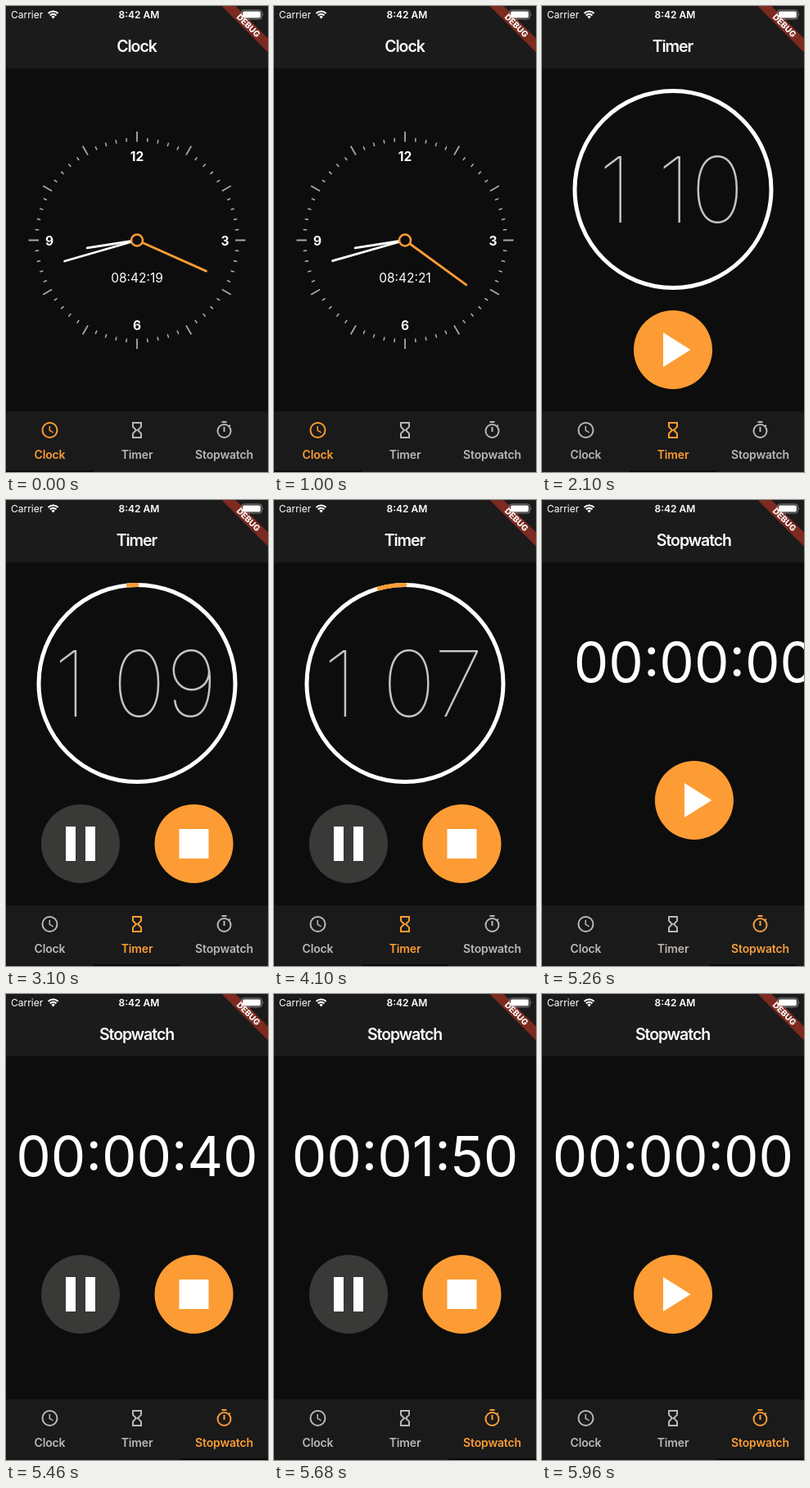
Animation, 320 px wide and 568 px high, one loop 6960 ms. Source, as an HTML page:

```html
<!DOCTYPE html>
<html lang="en">
<head>
<meta charset="utf-8">
<title>Clock app</title>
<style>
  html, body { margin: 0; width: 100%; height: 100%; overflow: hidden; background: #0d0d0d; }
  svg { display: block; width: 320px; height: 568px; }
  text { font-family: Inter, Roboto, "Liberation Sans", sans-serif; fill: #fff; text-anchor: middle; }
  .title { font-size: 19.5px; font-weight: 600; letter-spacing: -1.05px; }
  .numeral { font-size: 15.5px; font-weight: 700; }
  .digital { font-size: 15.5px; }
  .count { font-size: 111px; font-weight: 100; fill: #c4c4c4; }
  .watch { font-size: 67.5px; }
  .tab text { font-size: 14px; font-weight: 600; letter-spacing: -.15px; fill: currentColor; }
  .icon { fill: none; stroke: currentColor; stroke-width: 2; }
  .hand { stroke-width: 2.8; stroke-linecap: round; }
</style>
</head>
<body>
<svg id="stage" viewBox="0 0 320 568">
  <rect width="320" height="568" fill="#0d0d0d"/>
  <rect width="320" height="76" fill="#1b1b1b"/>

  <g id="pages">
    <g>
      <text class="title" x="159.5" y="55.5">Clock</text>
      <g id="dial" transform="translate(160 285.5)"></g>
      <text class="digital" id="digital" x="160" y="337"></text>
    </g>
    <g transform="translate(320)">
      <text class="title" x="159.5" y="55.5">Timer</text>
      <circle cx="160" cy="223.5" r="120" fill="none" stroke="#fff" stroke-width="5"/>
      <path id="arc" fill="none" stroke="#fd9c34" stroke-width="5" stroke-linecap="round"/>
      <text class="count" id="count" x="158" y="264.3"></text>
      <g id="timerKeys" transform="translate(0 419)"></g>
    </g>
    <g transform="translate(640)">
      <text class="title" x="159.5" y="55.5">Stopwatch</text>
      <text class="watch" id="watch" x="160" y="222"></text>
      <g id="watchKeys" transform="translate(0 366)"></g>
    </g>
  </g>

  <rect y="494" width="320" height="74" fill="#1a1a1a"/>
  <rect id="marker" y="566" width="106.7" height="2" fill="#080808"/>
  <g class="tab" transform="translate(53.5)">
    <g class="icon" transform="translate(-12 505)">
      <circle cx="12" cy="12" r="9"/>
      <path d="M11.8 7v5.3l4.3 2.6" stroke-width="1.5"/>
    </g>
    <text y="552">Clock</text>
  </g>
  <g class="tab" transform="translate(160)">
    <path class="icon" transform="translate(-12 505)" d="M7 3H17V7.9L13 12L17 16.1V21H7V16.1L11 12L7 7.9Z"/>
    <text y="552">Timer</text>
  </g>
  <g class="tab" transform="translate(266.5)">
    <g class="icon" transform="translate(-12 505)">
      <circle cx="12" cy="13" r="8"/>
      <path d="M9 2H15M12 8V14M17.4 7.6L19.3 5.7"/>
    </g>
    <text y="552">Stopwatch</text>
  </g>

  <g transform="translate(320 0) rotate(45)">
    <rect x="-42" y="28" width="84" height="12" fill="#7d2a20"/>
    <text y="37.4" font-size="10.2" font-weight="800">DEBUG</text>
  </g>
  <text x="6" y="15" font-size="12" style="text-anchor:start">Carrier</text>
  <g fill="none" stroke="#fff" stroke-width="2.1">
    <path d="M51.6 8.9A8.7 8.7 0 0 1 63.6 8.9M53.8 11.4A5.4 5.4 0 0 1 61.4 11.4"/>
    <path d="M55.4 13.1A3.2 3.2 0 0 1 59.8 13.1L57.6 15.5Z" fill="#fff" stroke="none"/>
  </g>
  <text x="162.5" y="15" font-size="12" font-weight="600">8:42 AM</text>
  <rect x="287.5" y="5" width="25" height="11" rx="3" fill="none" stroke="#fff" stroke-opacity=".45"/>
  <rect x="289" y="6.5" width="22" height="8" rx="1.8" fill="#fff"/>
  <path d="M313.8 8.8q1.6 1.7 0 3.4z" fill="#fff" fill-opacity=".5"/>
</svg>

<script>
const LOOP = 6960, STEP = 20;
const ORANGE = [253, 156, 52], GREY = [184, 184, 184];
const TIMER_TOTAL = 70;

// Share of each page swipe done after every step
const SWIPES = [
  { start: 2000, done: [.06, .25, .55, .82, .96, 1] },
  { start: 5120, done: [.03, .08, .16, .28, .44, .62, .8, .919, .98, 1] }
];

const $ = id => document.getElementById(id);
const pad = n => String(n).padStart(2, "0");
const tabs = [...document.querySelectorAll(".tab")];

function point(angle, r) {
  const a = angle * Math.PI / 180;
  return [r * Math.sin(a), -r * Math.cos(a)].map(v => v.toFixed(2));
}

function spoke(angle, from, to) {
  return `M${point(angle, from)}L${point(angle, to)}`;
}

function buildDial() {
  let hours = "", minutes = "";
  for (let i = 0; i < 60; i++) {
    if (i % 5) minutes += spoke(i * 6, 120.5, 125);
    else hours += spoke(i * 6, 120, 132.5);
  }
  const numerals = [[12, 0, -97], [3, 107.5, 6], [6, 0, 109], [9, -107, 6]]
    .map(([n, x, y]) => `<text class="numeral" x="${x}" y="${y}">${n}</text>`).join("");
  $("dial").innerHTML = `
    <path d="${hours}" stroke="#a8a8a8" stroke-width="1.8"/>
    <path d="${minutes}" stroke="#b0b0b0" stroke-width="1.5"/>
    ${numerals}
    <path class="hand" id="hourHand" stroke="#fff"/>
    <path class="hand" id="minuteHand" stroke="#fff"/>
    <path class="hand" id="secondHand" stroke="#fd9c34"/>
    <circle r="7" fill="#0d0d0d" stroke="#fd9c34" stroke-width="2.6"/>`;
}

function buildKeys(group) {
  group.innerHTML = `
    <g>
      <circle cx="160" r="48" fill="#fd9c34"/>
      <path d="M148-21L181.5 0L148 21Z" fill="#fff"/>
    </g>
    <g>
      <circle cx="91" r="48" fill="#393938"/>
      <path d="M73-21h12v42h-12zM97-21h12v42h-12z" fill="#fff"/>
      <circle cx="229.5" r="48" fill="#fd9c34"/>
      <rect x="211.5" y="-18" width="36" height="36" fill="#fff"/>
    </g>`;
}

function showKeys(group, running) {
  group.children[0].style.display = running ? "none" : "";
  group.children[1].style.display = running ? "" : "none";
}

function pageAt(t) {
  return SWIPES.reduce((sum, { start, done }) => {
    if (t < start) return sum;
    const i = Math.floor((t - start) / STEP);
    return sum + done[Math.min(i, done.length - 1)];
  }, 0);
}

function drawPage(page) {
  $("pages").setAttribute("transform", `translate(${-320 * page})`);
  $("marker").setAttribute("x", 106.7 * page);
  tabs.forEach((tab, i) => {
    const k = Math.max(0, 1 - Math.abs(page - i));
    const mix = GREY.map((g, c) => Math.round(g + (ORANGE[c] - g) * k));
    tab.style.color = `rgb(${mix})`;
  });
}

function drawClock(t) {
  const sec = 19 + Math.min(3, Math.floor(t / 500));
  const min = 42 + sec / 60;
  $("hourHand").setAttribute("d", spoke((8 + min / 60) * 30, 0, 61.5));
  $("minuteHand").setAttribute("d", spoke(min * 6, 0, 92));
  $("secondHand").setAttribute("d", spoke(sec * 6, 0, 92.5));
  $("digital").textContent = `08:42:${sec}`;
}

function drawTimer(t) {
  const running = t >= 2600 && t < 4620;
  const gone = running ? Math.floor((t - 2600) / 500) : 0;
  const left = TIMER_TOTAL - gone;
  const [x, y] = point(-360 * gone / TIMER_TOTAL, 120);
  $("arc").setAttribute("d", gone ? `M160 103.5A120 120 0 0 0 ${160 + +x} ${223.5 + +y}` : "");
  $("count").textContent = `${Math.floor(left / 60)} ${pad(left % 60)}`;
  showKeys($("timerKeys"), running);
}

function drawWatch(t) {
  const running = t >= 5380 && t < 5960;
  const hundredths = running ? Math.floor((t - 5380) / STEP) * 10 : 0;
  $("watch").textContent = `00:${pad(Math.floor(hundredths / 100))}:${pad(hundredths % 100)}`;
  showKeys($("watchKeys"), running);
}

function draw(now) {
  const t = now % LOOP;
  drawPage(pageAt(t));
  drawClock(t);
  drawTimer(t);
  drawWatch(t);
}

function tick() {
  draw(performance.now());
  requestAnimationFrame(tick);
}

buildDial();
buildKeys($("timerKeys"));
buildKeys($("watchKeys"));
draw(0);
requestAnimationFrame(tick);
</script>
</body>
</html>
```
